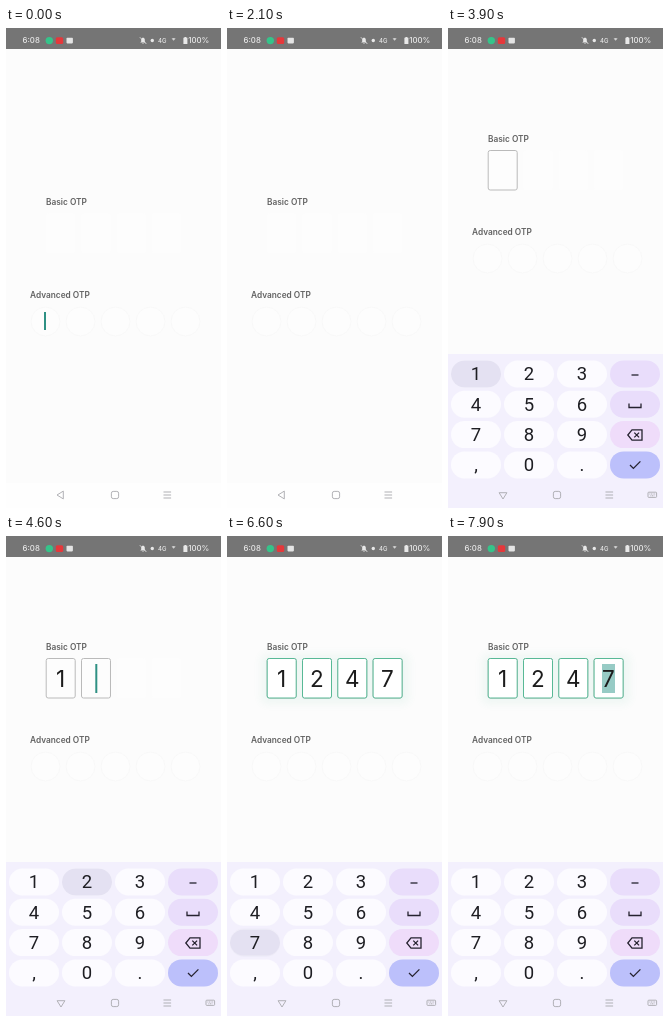
Animation of 215x480 px, one loop 8000 ms. Source, as an HTML page:

```html
<!DOCTYPE html>
<html lang="en">
<head>
<meta charset="utf-8">
<title>OTP input</title>
<style>
html, body { margin: 0; width: 100%; height: 100%; overflow: hidden; background: #fcfcfc; }
svg { display: block; width: 215px; height: 480px; font-family: Inter, sans-serif; font-optical-sizing: none; }

.label { font-size: 8.3px; font-weight: 600; fill: #626262; }
.digit { font-size: 22.5px; fill: #1c1c1c; text-anchor: middle; }
.status { font-size: 7.8px; font-weight: 500; fill: #e8e8e8; }
.slot { fill: #fdfdfd; }
.ring { fill: #fdfdfd; stroke: #f8f8f8; }
.line { fill: #fdfdfd; stroke: #bababa; }
.valid { fill: #fff; stroke: #58b996; }
.glow { fill: #4cb58f; opacity: .07; }
.caret { fill: #2f9184; shape-rendering: crispEdges; }
.nav { fill: none; stroke: #a9a9ad; stroke-width: .9; stroke-linejoin: round; }
.key { fill: #fcfbff; }
.press { fill: #e4e1f2; }
.num { font: 18.5px Roboto, sans-serif; fill: #1e1e23; text-anchor: middle; }
.icon { fill: none; stroke: #25222f; stroke-width: 1.3; }

/* One loop is 8 s, so 1% is 80 ms */
.step, .move { animation: 8s infinite; }
.step { animation-timing-function: step-end; }
.move { animation-timing-function: linear; }

#form { animation-name: form; }
#keyboard { animation-name: keyboard; }
#back { animation-name: back; transform-origin: 55px 467px; }
#toggle { animation-name: toggle; }
#caretA { animation-name: caretA; }
#caret1 { animation-name: caret1; }
#caret2 { animation-name: caret2; }
#caret3 { animation-name: caret3; }
#caret4 { animation-name: caret4; }
#focus { animation-name: focus; }
#typed1 { animation-name: typed1; }
#typed2 { animation-name: typed2; }
#typed3 { animation-name: typed3; }
#typed4 { animation-name: typed4; }
#touch { animation-name: touch; }
#select { animation-name: select; }
#press1 { animation-name: press1; }
#press2 { animation-name: press2; }
#press4 { animation-name: press4; }
#press7 { animation-name: press7; }

@keyframes form {
  0%, 36%, 87.25%, 93.75% { transform: translateY(63px); }
  37.25%, 85.6%, 95%, 100% { transform: none; }
}
@keyframes keyboard {
  0% { transform: translateY(155px); }
  35% { transform: translateY(155px); animation-timing-function: cubic-bezier(.215, .61, .355, 1); }
  41.1% { transform: none; }
  83.75% { transform: none; animation-timing-function: ease-in-out; }
  87.5% { transform: translateY(155px); }
  92.5% { transform: translateY(155px); animation-timing-function: cubic-bezier(.215, .61, .355, 1); }
  98%, 100% { transform: none; }
}
@keyframes back {
  0%, 37%, 88%, 93.5% { transform: rotate(0deg); }
  42.25%, 84%, 98%, 100% { transform: rotate(-90deg); }
}
@keyframes toggle { 0%, 86% { opacity: 0; } 38%, 94.5%, 100% { opacity: 1; } }

@keyframes caretA { 0%, 11.875% { opacity: 1; } 5%, 18.75%, 100% { opacity: 0; } }
@keyframes caret1 { 0%, 33.75%, 43.125%, 50.625%, 100% { opacity: 0; } 27.5%, 36.25%, 49.4% { opacity: 1; } }
@keyframes caret2 { 0%, 58.75%, 100% { opacity: 0; } 50.625% { opacity: 1; } }
@keyframes caret3 { 0%, 65%, 100% { opacity: 0; } 58.75% { opacity: 1; } }
@keyframes caret4 { 0%, 76.875%, 100% { opacity: 0; } 70% { opacity: 1; } }

@keyframes focus { 0% { opacity: 0; } 40.625%, 100% { opacity: 1; } }
@keyframes typed1 { 0% { opacity: 0; } 50.625%, 100% { opacity: 1; } }
@keyframes typed2 { 0% { opacity: 0; } 58.75%, 100% { opacity: 1; } }
@keyframes typed3 { 0% { opacity: 0; } 70%, 100% { opacity: 1; } }
@keyframes typed4 { 0% { opacity: 0; } 82.5%, 100% { opacity: 1; } }
@keyframes touch { 0%, 92.5%, 100% { opacity: 0; } 91.25% { opacity: 1; } }
@keyframes select { 0% { opacity: 0; } 92.5%, 100% { opacity: 1; } }

@keyframes press1 { 0%, 51%, 100% { opacity: 0; } 48.75% { opacity: 1; } }
@keyframes press2 { 0%, 59.5%, 100% { opacity: 0; } 57% { opacity: 1; } }
@keyframes press4 { 0%, 70.25%, 100% { opacity: 0; } 67.5% { opacity: 1; } }
@keyframes press7 { 0%, 82.75%, 100% { opacity: 0; } 80.25% { opacity: 1; } }
</style>
</head>
<body>
<svg viewBox="0 0 215 480">
  <defs>
    <rect id="box" x="40.2" y="122.5" width="29" height="39.5" rx="2"/>
    <rect id="caret" x="54" y="128" width="2" height="29"/>
    <rect id="pill" x="3" y="332.5" width="50" height="27" rx="13.5"/>
    <circle id="dot" cx="39.5" cy="230.5" r="14.5"/>
    <g id="keyRow">
      <use href="#pill"/><use href="#pill" x="53"/><use href="#pill" x="106"/>
    </g>
    <filter id="blur" x="-20%" y="-40%" width="140%" height="180%"><feGaussianBlur stdDeviation="4"/></filter>
  </defs>

  <rect width="215" height="480" fill="#fcfcfc"/>
  <rect y="455" width="215" height="25" fill="#fefefe"/>

  <g id="form" class="move">
    <text class="label" x="40" y="114">Basic OTP</text>
    <text class="label" x="24" y="207">Advanced OTP</text>
    <g class="slot">
      <use href="#box"/><use href="#box" x="35.3"/><use href="#box" x="70.6"/><use href="#box" x="105.9"/>
    </g>
    <g class="ring">
      <use href="#dot"/><use href="#dot" x="35"/><use href="#dot" x="70"/><use href="#dot" x="105"/><use href="#dot" x="140"/>
    </g>
    <rect id="caretA" class="caret step" x="38" y="221" width="2" height="18"/>

    <use id="focus" class="line step" href="#box"/>
    <g id="typed1" class="step">
      <use class="line" href="#box" x="35.3"/>
      <text class="digit" x="54.5" y="150.6">1</text>
    </g>
    <g id="typed2" class="step">
      <use class="line" href="#box" x="70.6"/>
      <text class="digit" x="89.9" y="150.6">2</text>
    </g>
    <g id="typed3" class="step">
      <use class="line" href="#box" x="105.9"/>
      <text class="digit" x="125.2" y="150.6">4</text>
    </g>
    <g id="typed4" class="step">
      <rect class="glow" x="34" y="118" width="148" height="50" rx="6" filter="url(#blur)"/>
      <g class="valid">
        <use href="#box"/><use href="#box" x="35.3"/><use href="#box" x="70.6"/><use href="#box" x="105.9"/>
      </g>
      <rect id="touch" class="step" x="160" y="135" width="9" height="9" rx="2" fill="#d3e0ea"/>
      <rect id="select" class="step" x="154" y="128" width="13" height="29" fill="#97cbc5"/>
      <g class="digit">
        <text x="54.5" y="150.6">1</text><text x="89.9" y="150.6">2</text>
        <text x="125.2" y="150.6">4</text><text x="160.4" y="150.6">7</text>
      </g>
    </g>

    <use id="caret1" class="caret step" href="#caret"/>
    <use id="caret2" class="caret step" href="#caret" x="35.3"/>
    <use id="caret3" class="caret step" href="#caret" x="70.6"/>
    <use id="caret4" class="caret step" href="#caret" x="105.9"/>
  </g>

  <g id="keyboard" class="move">
    <rect y="326" width="215" height="160" fill="#f3f0fd"/>
    <g class="key">
      <use href="#keyRow"/><use href="#keyRow" y="30.3"/><use href="#keyRow" y="60.6"/><use href="#keyRow" y="90.9"/>
    </g>
    <g class="press">
      <use id="press1" class="step" href="#pill"/>
      <use id="press2" class="step" href="#pill" x="53"/>
      <use id="press4" class="step" href="#pill" y="30.3"/>
      <use id="press7" class="step" href="#pill" y="60.6"/>
    </g>
    <use href="#pill" x="159" fill="#e9ddfb"/>
    <use href="#pill" x="159" y="30.3" fill="#e9ddfb"/>
    <use href="#pill" x="159" y="60.6" fill="#efdcfa"/>
    <use href="#pill" x="159" y="90.9" fill="#bcc0fb"/>
    <g class="num">
      <text x="28" y="352.4">1</text><text x="81" y="352.4">2</text><text x="134" y="352.4">3</text>
      <text x="28" y="382.7">4</text><text x="81" y="382.7">5</text><text x="134" y="382.7">6</text>
      <text x="28" y="413">7</text><text x="81" y="413">8</text><text x="134" y="413">9</text>
      <text x="28" y="443.3">,</text><text x="81" y="443.3">0</text><text x="134" y="443.3">.</text>
    </g>
    <g class="icon">
      <path d="M183.5 347h7"/>
      <path d="M181 375.5v4h12v-4"/>
      <path d="M184 401.8h10v10.4h-10l-4.2-5.2zM186.3 404.6l4.8 4.8m0-4.8l-4.8 4.8"/>
      <path d="M182 437l3.4 3.4 7-7"/>
    </g>
  </g>

  <g class="nav">
    <path id="back" class="move" d="M51 467l6.3-3.9v7.8z"/>
    <rect x="105.4" y="463.4" width="7.2" height="7.2" rx="1.8"/>
    <path d="M157.5 464h7.6m-7.6 3h7.6m-7.6 3h7.6"/>
    <g id="toggle" class="step">
      <rect x="200" y="464.2" width="8.6" height="5.2" rx=".8"/>
      <path d="M201.4 466h6m-5 1.8h4" stroke-dasharray="1 .6"/>
    </g>
  </g>

  <rect width="215" height="21" fill="#757575"/>
  <g class="status">
    <text x="16.6" y="15.2">6:08</text>
    <text x="182.2" y="15.2">100%</text>
    <text x="152" y="14.6" font-size="6">4G</text>
  </g>
  <circle cx="43.3" cy="12.6" r="3.7" fill="#35c48a"/>
  <rect x="49.8" y="9.3" width="7.4" height="6.6" rx="1.5" fill="#e5383b"/>
  <rect x="60.5" y="9.8" width="6.4" height="5.6" rx=".8" fill="#e4e4e4"/>
  <g fill="#e8e8e8">
    <path d="M134.2 14.6l1-1.2v-1.8q.2-2 1.8-2.2 1.7.2 1.8 2.2v1.8l1 1.2zM136.2 15.1h1.6l-.8.8z"/>
    <circle cx="146.3" cy="12.5" r="1.7"/>
    <path d="M165.6 10.6q2-1.4 4 0l-2 2.2z" opacity=".8"/>
    <path d="M177.4 9.8h1v-.9h2v.9h1v6.2h-4z"/>
  </g>
  <path d="M133.8 9.2l6.6 6.8" stroke="#e8e8e8" stroke-width=".8"/>
</svg>
</body>
</html>
```
